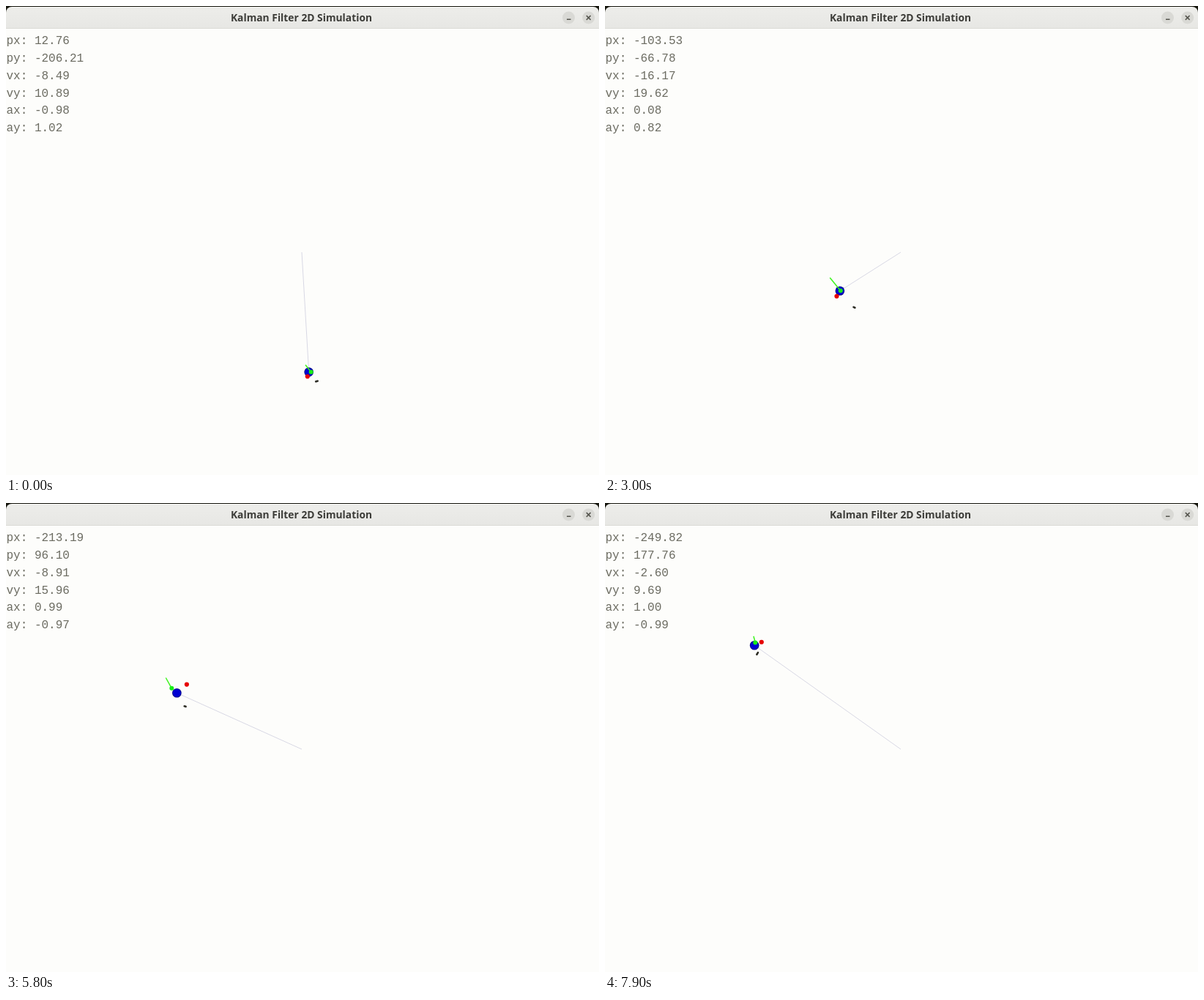
An HTML page with a canvas for the animation above (8000 ms loop, 810 by 640 pixels).

```html
<!DOCTYPE html>
<html lang="en">
<head>
<meta charset="utf-8">
<title>Kalman Filter 2D Simulation</title>
<style>
  html, body { margin: 0; width: 100%; height: 100%; overflow: hidden; }
  #stage { position: relative; width: 810px; height: 640px; overflow: hidden; background: #fdfdfb; }
  #top { position: absolute; inset: 0 0 auto; height: 31px; background: #17170f; }
  #bar {
    position: absolute; inset: 1px 0 0; box-sizing: border-box;
    border-radius: 8px 8px 0 0; border-bottom: 1px solid #dadad6;
    background: linear-gradient(#ededea, #e7e7e4);
    font: bold 13.84px/30px "Open Sans", "Noto Sans", sans-serif;
    color: #3c3c38; text-align: center; white-space: nowrap; text-indent: -3px;
  }
  #bar svg { position: absolute; left: 0; top: -1px; }
  #readout {
    position: absolute; left: .5px; top: 37px; margin: 0;
    font: 16px/23.85px "Liberation Mono", monospace; color: #6c6c62;
  }
  canvas { position: absolute; left: 0; top: 0; }
</style>
</head>
<body>
<div id="stage">
  <div id="top">
    <div id="bar">Kalman Filter 2D Simulation
      <svg width="810" height="31" fill="none" stroke="#55554e" stroke-width="1.5">
        <g fill="#d9d9d5" stroke="none"><circle cx="768.5" cy="16" r="8.5"/><circle cx="795.7" cy="16" r="8.5"/></g>
        <path d="M766 18.3h5.5M792.8 13.1l5.8 5.8m0-5.8l-5.8 5.8"/>
      </svg>
    </div>
  </div>
  <canvas id="scene" width="810" height="640"></canvas>
  <pre id="readout"></pre>
</div>
<script>
const STEP = 100, STEPS = 80, RATE = 3.03; // simulated seconds per real second
const ctx = document.getElementById('scene').getContext('2d');
const readout = document.getElementById('readout');

// One axis: unit acceleration that smoothly changes sign at time `turn`.
// Velocity and position are its exact integrals.
function axis(p0, v0, sign, turn, soft) {
  const area = u => (u * Math.hypot(u, soft) + soft * soft * Math.asinh(u / soft)) / 2;
  const base = v0 - sign * RATE * Math.hypot(turn, soft);
  return t => {
    const u = t - turn, h = Math.hypot(u, soft);
    return {
      p: p0 + RATE * (base * t + sign * RATE * (area(u) - area(-turn))),
      v: base + sign * RATE * h,
      a: sign * u / h
    };
  };
}

const axisX = axis(12.76, -8.49, 1, 2.97, .47);
const axisY = axis(-206.21, 10.89, -1, 3.75, .5);

const bump = (t, mid, width) => Math.exp(-(((t - mid) / width) ** 2));

function random(n) {
  const s = Math.sin(n * 127.1 + 311.7) * 43758.5453;
  return s - Math.floor(s);
}

// Roughly normal, with the given spread.
function noise(step, channel, spread) {
  const n = step * 17 + channel * 3;
  return (random(n) + random(n + 1) + random(n + 2) - 1.5) * 2 * spread;
}

function dot(x, y, r, color) {
  ctx.fillStyle = color;
  ctx.beginPath();
  ctx.arc(x, y, r, 0, 7);
  ctx.fill();
}

function line(x, y, dx, dy, width, color) {
  ctx.strokeStyle = color;
  ctx.lineWidth = width;
  ctx.beginPath();
  ctx.moveTo(x, y);
  ctx.lineTo(x + dx, y + dy);
  ctx.stroke();
}

function draw(step) {
  const t = step * STEP / 1000;
  const ex = axisX(t), ey = axisY(t);
  const rows = {
    px: ex.p, py: ey.p, vx: ex.v, vy: ey.v,
    ax: ex.a + noise(step, 1, .01), ay: ey.a + noise(step, 2, .01)
  };
  readout.textContent = Object.entries(rows)
    .map(([key, n]) => `${key}: ${n.toFixed(2)}`).join('\n');

  const x = 403.5 + ex.p * .798, y = 335.6 - ey.p * .795;
  // The true position runs ahead while the estimate catches up with each turn.
  const trueX = x + 3 - 10.5 * bump(t, 5.4, 1.9), trueY = y - 7 * bump(t, 6.4, 1.9);
  const tailX = x + 1 - ex.v * 1.15, tailY = y + ey.v * 1.15;
  const tickX = noise(step, 3, 1.5), tickY = noise(step, 4, 1.5);

  ctx.clearRect(0, 0, 810, 640);
  ctx.lineCap = 'butt';
  line(404, 336, x - 404, y - 336, 1, '#d8d8e4');
  dot(x, y, 6.3, '#000086');
  dot(x, y, 5.4, '#0000d2');
  dot(x + 5 + noise(step, 5, 8), y + noise(step, 6, 8), 3.1, '#e60000');
  line(trueX, trueY, ex.v * .9, -ey.v * .9, 1.5, '#3cf41c');
  dot(trueX, trueY, 3, '#18ec18');
  ctx.lineCap = 'round';
  line(tailX - tickX / 2, tailY - tickY / 2, tickX, tickY, 2.6, '#2c2c24');
}

const start = performance.now();
function tick() {
  draw(Math.floor((performance.now() - start) / STEP) % STEPS);
  requestAnimationFrame(tick);
}
tick();
</script>
</body>
</html>
```
